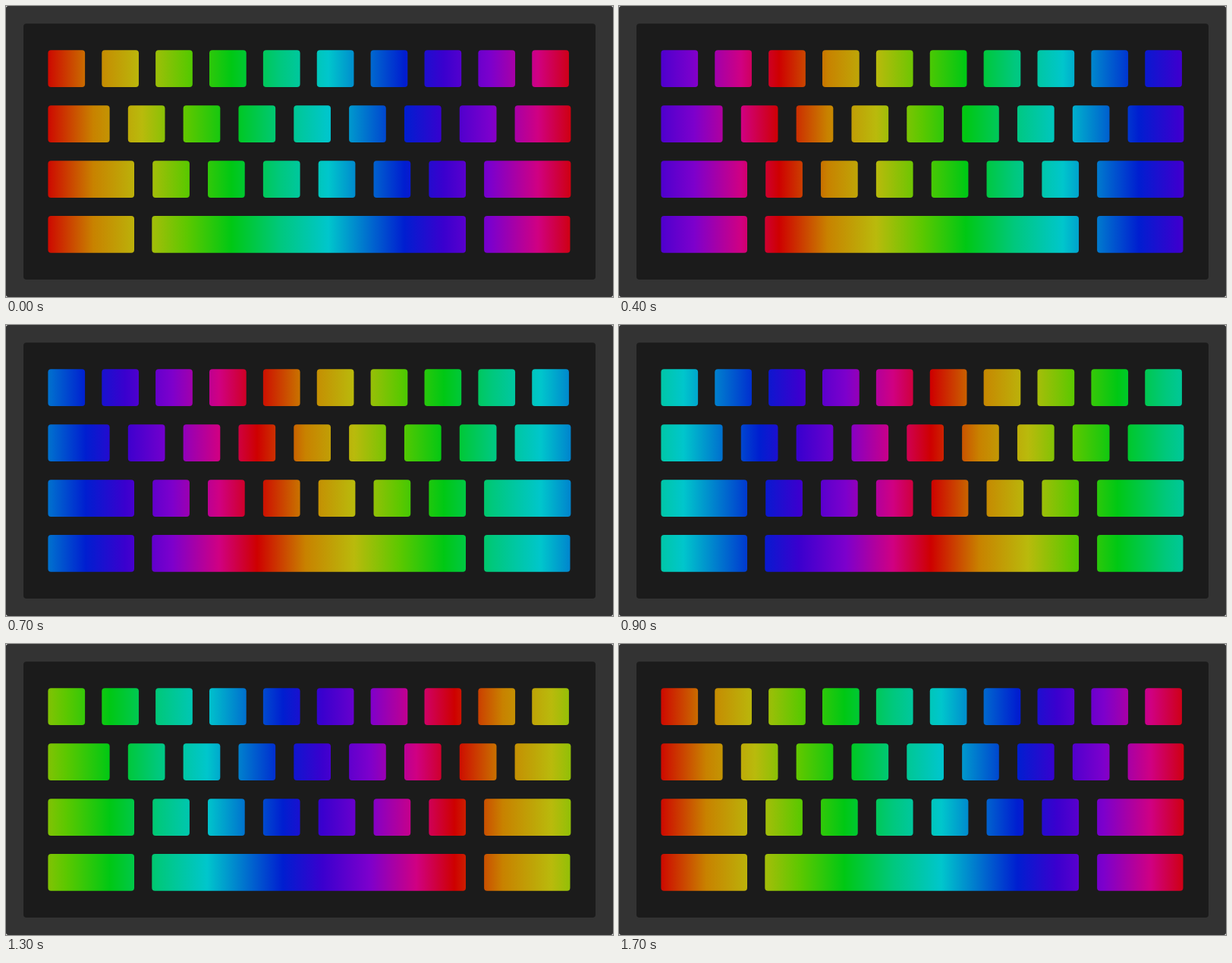
These frames come from a looping animation (800 px wide and 384 px high, 1.8 s). An HTML page with a canvas:

```html
<!DOCTYPE html>
<html lang="en">
<head>
<meta charset="utf-8">
<title>Rainbow keyboard</title>
<style>
  html, body { margin: 0; width: 100%; height: 100%; overflow: hidden; background: #fff; }
  canvas { display: block; }
</style>
</head>
<body>
<canvas id="stage" width="800" height="384"></canvas>
<script>
const ctx = document.getElementById('stage').getContext('2d');

const STEP_MS = 100;
const STEPS = 18;
const PERIOD = 700;   // width of one full rainbow
const ORIGIN = 51;    // where red starts at time zero

// [distance from red, colour]
const STOPS = [
  [0, 'rgb(206,0,0)'],
  [64, 'rgb(200,130,0)'],
  [128, 'rgb(185,186,12)'],
  [188, 'rgb(92,200,0)'],
  [246, 'rgb(0,200,20)'],
  [310, 'rgb(0,200,125)'],
  [374, 'rgb(0,198,204)'],
  [474, 'rgb(0,30,208)'],
  [526, 'rgb(58,0,206)'],
  [588, 'rgb(125,0,204)'],
  [650, 'rgb(208,0,130)'],
  [PERIOD, 'rgb(206,0,0)']
];

const KEY_HEIGHT = 48.7;
const evenKeys = (count, x, pitch) =>
  Array.from({ length: count }, (_, i) => [x + i * pitch, 48.7]);

// Each key is [x, width].
const ROWS = [
  { y: 58.2, keys: evenKeys(10, 55.4, 70.87) },
  { y: 131.2, keys: [[55.4, 81.2], ...evenKeys(7, 160.8, 72.83), [670.6, 73.8]] },
  { y: 204.2, keys: [[55.4, 113.6], ...evenKeys(6, 193.2, 72.83), [630.1, 114.3]] },
  { y: 277, keys: [[55.4, 113.6], [192.3, 413.7], [630.1, 113.4]] }
];

function roundBox(x, y, w, h, r, fill) {
  ctx.beginPath();
  ctx.roundRect(x, y, w, h, r);
  ctx.fillStyle = fill;
  ctx.fill();
}

// Steady travel with a small catch-up around step 12.
function travel(step) {
  const catchUp = 10 * Math.min(2, Math.max(0, step - 11));
  return (40 * step + catchUp) % PERIOD;
}

function rainbow(redX) {
  const gradient = ctx.createLinearGradient(redX - PERIOD, 0, redX + PERIOD, 0);
  for (const turn of [0, 1]) {
    for (const [distance, color] of STOPS) {
      gradient.addColorStop((turn + distance / PERIOD) / 2, color);
    }
  }
  return gradient;
}

function draw(step) {
  ctx.clearRect(0, 0, 800, 384);
  roundBox(0, 0, 800, 384, 3, '#333');
  roundBox(23, 23.3, 754, 337.7, 4, '#1b1b1b');
  const fill = rainbow(ORIGIN + travel(step));
  for (const { y, keys } of ROWS) {
    for (const [x, width] of keys) roundBox(x, y, width, KEY_HEIGHT, 4, fill);
  }
}

const start = performance.now();
function tick() {
  const elapsed = performance.now() - start;
  draw(Math.floor(elapsed / STEP_MS) % STEPS);
  requestAnimationFrame(tick);
}
tick();
</script>
</body>
</html>
```
